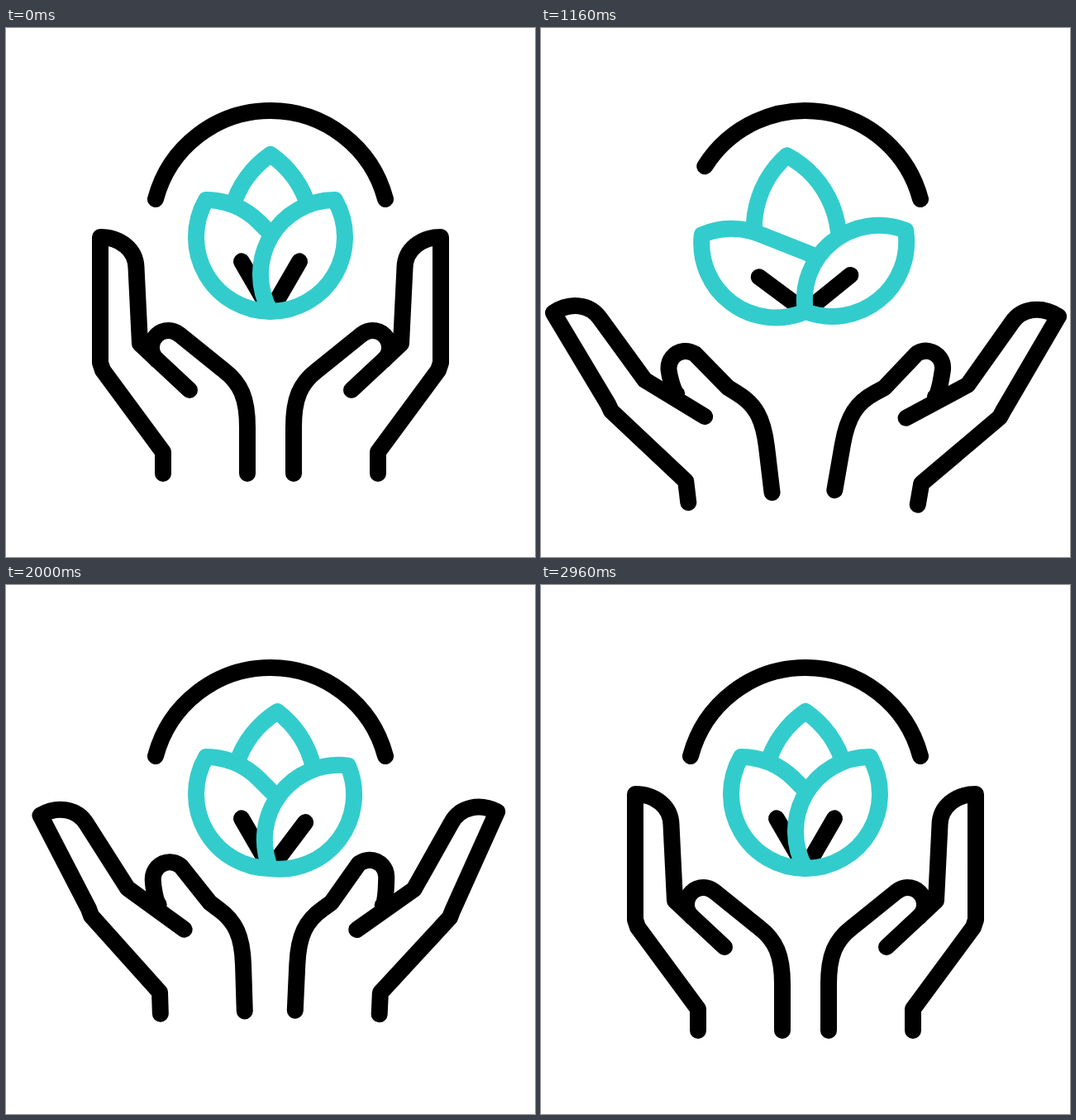
These frames come from a looping animation (640x640 px, 3.6 s). An HTML page:

```html
<!DOCTYPE html>
<html lang="en">
<head>
<meta charset="utf-8">
<title>Caring hands</title>
<style>
  html, body { margin: 0; width: 100%; height: 100%; overflow: hidden; background: #fff; }
  svg { display: block; width: 100vw; height: 100vh; }
  path { fill: none; stroke: #000; stroke-width: 20; stroke-linecap: round; stroke-linejoin: round; }
  .teal { stroke: #33cccc; }
  .paper { fill: #fff; stroke: none; }
</style>
</head>
<body>
<svg viewBox="0 0 640 640">
  <path id="arcOld"/>
  <path id="arcNew"/>
  <g id="top"><path class="teal" d="M-39.7 -43A118 118 0 0 1 0 -190A118 118 0 0 1 39.7 -43"/></g>
  <g id="left"></g>
  <g id="right"></g>
  <g id="handL"><path/><path/></g>
  <g id="handR"><path/><path/></g>
</svg>
<script>
const LOOP = 3600;
const $ = id => document.getElementById(id);
const rad = deg => deg * Math.PI / 180;

const hands = [
  { el: $('handL'), flip: '', bend: 28, reach: 10, tilt: 6.8, pivot: 641 },
  { el: $('handR'), flip: 'translate(640 0) scale(-1 1) ', bend: 24, reach: 13, tilt: 9.9, pivot: 577 }
];

// The finger bends at its crotch, the knuckles move out, the thumb moves up
function drawHand({ el, flip, bend, reach, tilt, pivot }, open, lift, lean) {
  const slide = (dx, dy) => (x, y) => `${x + dx * open} ${y + dy * open}`;
  const knuckle = slide(-7, 4), thumb = slide(reach, -reach), root = slide(9, 5);
  const c = Math.cos(rad(bend * open)), s = Math.sin(rad(bend * open));
  const finger = (x, y) => knuckle(162 + x * c + y * s, 382 - x * s + y * c);

  const [outer, inner] = el.children;
  outer.setAttribute('d', `M190 539V513L${knuckle(117, 414)}L${knuckle(114, 405)}
    L${finger(-48, -129)}C${finger(-24, -129)} ${finger(-5, -114)} ${finger(-4.5, -92)}
    L${knuckle(162, 382)}L222 438`);
  inner.setAttribute('d', `M${root(183, 402)}C${root(179, 398)} ${thumb(176, 393)} ${thumb(176, 387)}
    C${thumb(176, 375)} ${thumb(185, 366)} ${thumb(197, 366)}
    C${thumb(202, 366)} ${thumb(206, 368)} ${thumb(210, 371)}
    L254 406.5L264 414.5C284 430 292 448 292 483V539`);
  el.setAttribute('transform', `${flip}translate(0 ${lift}) rotate(${-tilt * lean} 241 ${pivot})`);
}

// Part of the upper arch between fractions a and b
function drawArc(id, a, b) {
  const at = p => {
    const w = rad((p - 0.5) * 150.4);
    return `${320 + 143.8 * Math.sin(w)} ${243.8 - 143.8 * Math.cos(w)}`;
  };
  $(id).setAttribute('d', b > a ? `M${at(a)}A143.8 143.8 0 0 1 ${at(b)}` : '');
}

function makePetal(id, d) {
  $(id).innerHTML = `<path class="paper" d="${d}"/><path d="M0 -8V-70"/><path class="teal" d="${d}"/>`;
}
// The left petal's inner edge runs on straight beneath the right petal
makePetal('left', 'M67.8 -4.6L41.9 -101.2A90 90 0 0 0 0 -155.9A90 90 0 0 0 0 0');
makePetal('right', 'M0 0A90 90 0 0 1 0 -155.9A90 90 0 0 1 0 0Z');

const turn = (id, angle) => $(id).setAttribute('transform', `translate(320 343) rotate(${angle})`);

function render() {
  const t = performance.now() % LOOP;
  // Smooth rise from 0 to 1 between two times
  const ramp = (from, to) => {
    const x = Math.min(1, Math.max(0, (t - from) / (to - from)));
    return x * x * (3 - 2 * x);
  };

  turn('top', -12.7 * ramp(335, 945) + 22.7 * ramp(945, 1590) - 10 * ramp(1590, 2200));
  turn('left', -30 - 27 * (ramp(335, 945) - ramp(945, 1890)));
  turn('right', 30 + 29 * (ramp(730, 1390) - ramp(1390, 2290)));

  drawArc('arcOld', ramp(1034, 1634), 1);
  drawArc('arcNew', 0, ramp(1330, 1930));

  const open = ramp(330, 1300) - ramp(1970, 2970);
  const lift = 29 * ramp(330, 1110) - 51 * ramp(1110, 1885) + 22 * ramp(2240, 2965);
  const lean = ramp(330, 1115) - ramp(1550, 2230);
  for (const hand of hands) drawHand(hand, open, lift, lean);

  requestAnimationFrame(render);
}
render();
</script>
</body>
</html>
```
